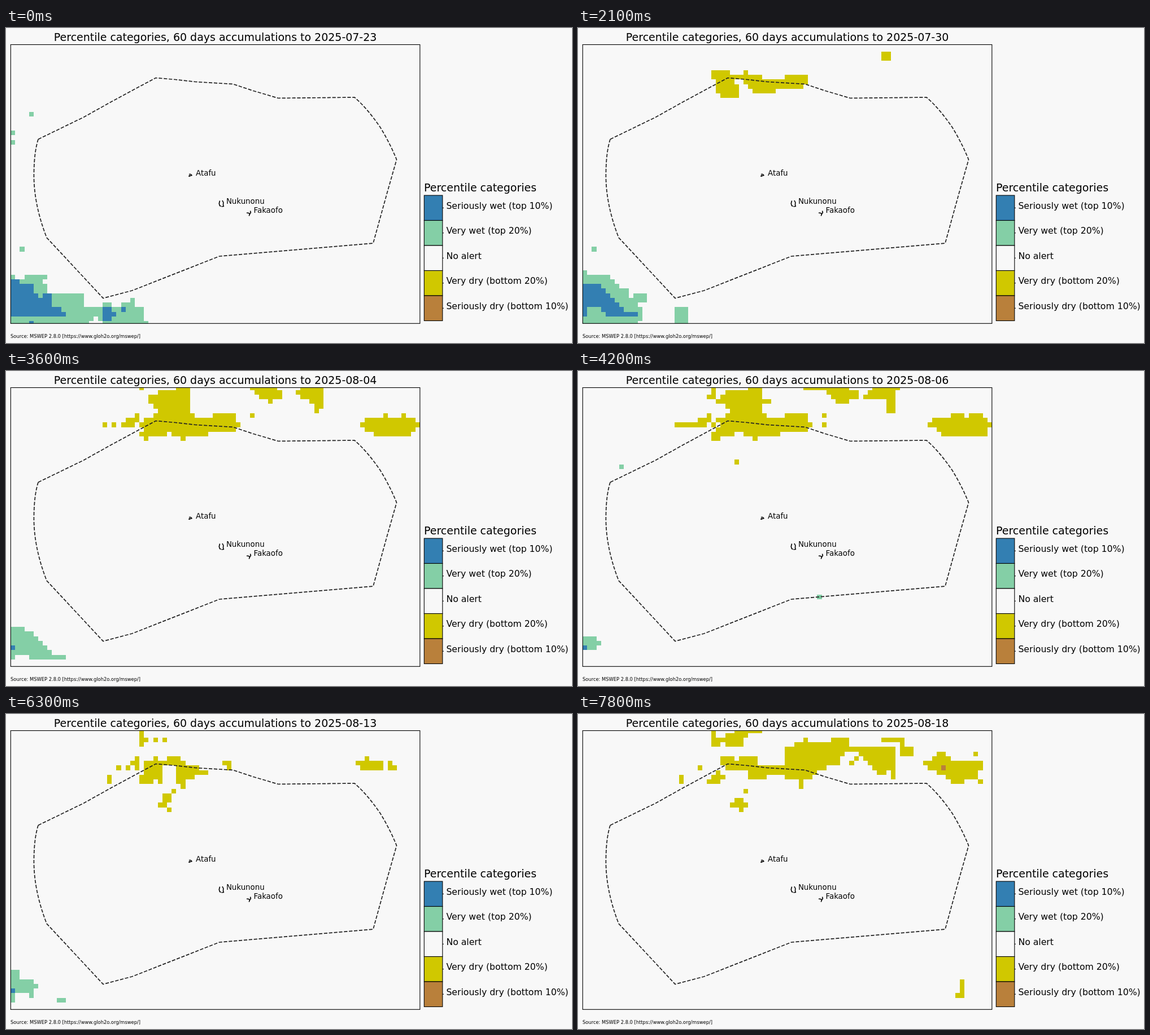
An HTML page that plays this animation: 1002 px wide and 559 px high, repeating every 8 s.

```html
<!DOCTYPE html>
<html lang="en">
<head>
<meta charset="utf-8">
<title>Percentile categories</title>
<style>
  html, body { margin: 0; width: 100%; height: 100%; overflow: hidden; background: #f8f8f8; }
  svg { display: block; width: 1002px; height: 559px; }
  text { font-family: "DejaVu Sans", sans-serif; fill: #000; }
  .head { font-size: 18.98px; }
  .key { font-size: 15.7px; }
  .place { font-size: 13.35px; }
  .line { fill: none; stroke: #000; stroke-width: 1.1; }
</style>
</head>
<body>
<svg viewBox="0 0 1002 559">
  <defs><clipPath id="frame"><rect x="8" y="29.4" width="725" height="494.8"/></clipPath></defs>
  <rect width="1002" height="559" fill="#f8f8f8"/>
  <g clip-path="url(#frame)">
    <g id="cells" transform="translate(8.2 25.4) scale(8.143 8.247)" shape-rendering="crispEdges"></g>
  </g>
  <path fill="none" stroke="#222" stroke-width="1.7" stroke-dasharray="6.2 2.7"
    d="M57 197.5L138 158L188 130L265 88.5L300 91.5L335 95.5L402 99.5L438 111.5L482 124.5L617 123Q640 143 663 177Q680 205 691.5 233.5L674 295L650 382L378 405L223 466L172 479.5L72 372Q48 310 49.5 255Q50 220 57 197.5"/>
  <g fill="none" stroke="#000" stroke-width="1.6" stroke-linejoin="round">
    <path d="M324 259.5l3 0 2 2-2 .5-3 1.2 1-2.2"/>
    <path d="M378.5 306.5l-1.2 5 1 3.5 2 1.5M383 306l1.8 3.5-.3 4.5 .8 2.5-4 .3"/>
    <path d="M432.5 324.5l.8 3-2 3-1 3M426 328l4 .5 1.5 2"/>
  </g>
  <rect class="line" x="8.3" y="29.5" width="724.5" height="494.8"/>
  <g class="place">
    <text x="336.1" y="261.5">Atafu</text>
    <text x="389.9" y="312">Nukunonu</text>
    <text x="438.5" y="328">Fakaofo</text>
  </g>
  <text id="title" class="head" x="370.6" y="23" text-anchor="middle"></text>
  <text class="head" x="740" y="289.5">Percentile categories</text>
  <g id="legend" class="key"></g>
  <text x="8" y="549.5" font-size="8.33">Source: MSWEP 2.8.0 [https://www.gloh2o.org/mswep/]</text>
</svg>
<script>
const LOOP = 8000, STEP = 300, DAYS = 27, COLS = 89, ROWS = 61;
const WET2 = 2, WET = 1, DRY = -1, DRY2 = -2;
const CATEGORIES = [
  [WET2, '#337fb2', 'Seriously wet (top 10%)'],
  [WET, '#84cfa6', 'Very wet (top 20%)'],
  [0, '#f8f8f8', 'No alert'],
  [DRY, '#d0c800', 'Very dry (bottom 20%)'],
  [DRY2, '#b9803b', 'Seriously dry (bottom 10%)'],
];

// Outlines of the alert areas in grid units on selected days; days between are blended.
const KEY_DAYS = [
  { day: 0, areas: [
    [WET, 'M4 15h1v1h-1M0 19h1v1h-1M0 21h1v1h-1M2 44h1v1h-1'],
    [WET, 'M0 50H1V51H3V50H8V51H7V52H8V54H16V57H20V56H22V57H24V56H26V55H27V57H29V60H30V61H20V60H19V59H18V60H17V61H0z'],
    [WET2, 'M0 51H2V52H5V54H6V55H7V54H9V57H11V58H12V59H0zM4 60h1v1h-1M20 57H22V58H23V59H22V60H20zM24 57h1v1h-1'],
  ] },
  { day: 4, areas: [
    [WET, 'M2 44h1v2h-1M16 45h2v1h-2M15 47H19V48H18V49H15zM22 48h1v1h-1M24 51H26V52H27V53H26V54H25V53H24zM23 53h1v1h-1'],
    [WET, 'M0 49H1V50H8V54H15V56H13V57H11V58H20V56H22V57H24V56H26V57H28V58H29V60H30V61H19V59H15V61H0z'],
    [WET2, 'M0 51H6V52H5V54H6V55H5V57H2V58H1V59H0zM7 54h2v1h-2M6 55h1v1h-1M9 57H11V58H12V59H9zM20 57h3v4h-3'],
  ] },
  { day: 9, areas: [
    [WET, 'M2 44h1v1h-1M0 49H1V50H5V51H7V52H8V53H10V54H14V56H13V55H12V57H13V58H12V61H2V60H1V61H0zM6 52h1v1h-1M10 54h1v1h-1M9 55h1v2h-1M20 57H22V59H21V58H20z'],
    [WET2, 'M0 52H3V53H5V54H6V55H7V56H8V57H9V58H12V59H4V57H1V59H0z'],
    [DRY, 'M28 0h1v1h-1M65 1H67V2H68V4H67V6H66V4H64V2H65zM52 6h1v1h-1M20 8h1v1h-1M22 7H24V8H23V9H22zM24 8h2v1h-2'],
    [DRY, 'M27 6H33V7H34V6H37V7H40V8H43V7H46V6H48V7H50V9H48V11H47V10H43V11H36V9H35V8H33V9H34V10H35V12H29V8H26V7H27z'],
  ] },
  { day: 14, areas: [
    [WET, 'M8 17h1v1h-1M51 45h1v1h-1M0 54H3V55H4V56H3V57H0z'],
    [WET2, 'M0 56h1v1h-1'],
    [DRY, 'M36 0H39V3H41V4H39V6H40V7H44V6H49V8H50V9H49V10H43V11H38V12H37V11H35V10H33V11H30V12H28V10H29V9H30V8H29V7H31V6H32V5H31V4H29V3H30V2H31V1H36z'],
    [DRY, 'M28 0H29V3H27V2H28zM27 6H28V8H27V9H20V8H25V7H27zM28 8h1v1h-1M52 6h1v1h-1M52 8h1v1h-1M33 16h1v1h-1'],
    [DRY, 'M48 0H58V1H60V3H58V4H55V3H54V2H53V1H48zM63 0H69V1H68V6H66V3H61V2H62V1H63z'],
    [DRY, 'M80 6H83V7H84V6H87V7H88V8H89V9H88V11H78V10H77V9H75V8H76V7H80z'],
  ] },
  { day: 18, areas: [
    [WET, 'M0 54H2V55H5V56H4V57H1V58H0z'],
    [DRY, 'M28 0H29V1H32V0H39V4H36V3H29V4H27V3H25V2H26V1H28zM37 4h1v1h-1M34 5h1v1h-1M36 5h1v1h-1'],
    [DRY, 'M30 6H41V7H43V8H45V6H50V7H49V9H43V10H39V11H36V10H35V9H33V10H32V11H30V12H28V10H31V9H29V7H30z'],
    [DRY, 'M28 6H29V7H28V8H27V9H22V8H25V7H28zM52 6h2v1h-2M52 8h1v1h-1M35 13h1v1h-1M33 15h1v2h-1'],
    [DRY, 'M48 0H61V2H63V0H69V1H68V5H67V6H66V4H64V3H60V5H57V4H54V3H51V2H50V1H48zM61 4h1v1h-1M69 2h1v1h-1'],
    [DRY, 'M87 1H89V2H88V4H89V7H88V8H87V9H79V10H77V9H76V8H75V7H76V4H85V3H86V2H87z'],
  ] },
  { day: 21, areas: [
    [WET, 'M0 52H2V54H5V55H6V56H5V58H4V57H1V59H0zM10 58h2v1h-2'],
    [WET2, 'M0 56h1v1h-1'],
    [DRY, 'M28 0H29V2H30V3H29V4H28zM31 2h1v1h-1M33 2h1v1h-1M27 6H28V9H27V8H26V7H27zM23 8h1v1h-1M25 8h1v1h-1M21 10h1v2h-1'],
    [DRY, 'M31 6H32V7H34V6H37V7H38V8H41V9H43V10H40V11H38V13H37V12H36V8H33V12H32V11H31V12H28V10H29V7H31z'],
    [DRY, 'M35 13h1v1h-1M33 14H35V16H34V17H32V16H33zM34 17h1v1h-1M46 7H48V9H47V8H46zM77 6H78V7H81V9H76V8H75V7H77zM82 7H83V8H84V9H82z'],
  ] },
  { day: 26, areas: [
    [DRY, 'M28 0H29V2H31V1H33V0H39V1H36V2H35V4H31V3H30V4H28zM25 8h1v1h-1M21 10h1v2h-1M29 9H30V10H31V11H30V12H27V11H28V10H29z'],
    [DRY, 'M30 6H33V7H34V6H38V8H44V4H46V3H48V2H49V3H54V2H58V4H68V10H67V9H66V10H64V9H63V8H62V7H61V6H60V5H57V6H56V8H53V9H51V10H50V11H48V13H47V11H44V10H40V11H36V9H31V8H30z'],
    [DRY, 'M65 2H70V4H72V6H69V3H65zM67 10h1v1h-1M35 13h1v1h-1M33 15H35V16H36V17H35V18H34V17H32V16H33zM59 6H60V7H59V8H58V7H59z'],
    [DRY, 'M77 5H79V6H80V7H87V9H86V11H83V12H80V11H79V10H77V9H75V8H74V7H76V6H77zM85 5h1v1h-1M86 11h1v1h-1M82 54H83V58H81V57H82z'],
    [DRY2, 'M78 8h1v1h-1'],
  ] },
];

const probe = document.createElement('canvas').getContext('2d');

function gridOf(areas) {
  const grid = new Float32Array(COLS * ROWS);
  for (const [level, outline] of areas) {
    const path = new Path2D(outline);
    for (let i = 0; i < grid.length; i++) {
      if (probe.isPointInPath(path, i % COLS + .5, Math.floor(i / COLS) + .5, 'evenodd')) grid[i] = level;
    }
  }
  return grid;
}

function neighbourMean(grid, i) {
  const col = i % COLS, row = Math.floor(i / COLS);
  let sum = 0, count = 0;
  for (let r = Math.max(0, row - 1); r <= Math.min(ROWS - 1, row + 1); r++) {
    for (let c = Math.max(0, col - 1); c <= Math.min(COLS - 1, col + 1); c++) {
      sum += grid[r * COLS + c];
      count++;
    }
  }
  return sum / count;
}

// Areas grow and shrink from their edges: the blend leans on each cell's surroundings.
function blend(from, to, u) {
  const mix = from.map((v, i) => v + (to[i] - v) * u);
  const lean = 2 * u * (1 - u);
  return mix.map((v, i) => Math.round(v + lean * (neighbourMean(mix, i) - v)));
}

function runsPath(grid, level) {
  let d = '';
  for (let row = 0; row < ROWS; row++) {
    for (let col = 0; col < COLS; col++) {
      const start = col;
      while (col < COLS && grid[row * COLS + col] === level) col++;
      if (col > start) d += `M${start} ${row}H${col}v1H${start}z`;
    }
  }
  return d;
}

function svg(tag, attrs, parent) {
  const el = document.createElementNS('http://www.w3.org/2000/svg', tag);
  for (const key in attrs) el.setAttribute(key, attrs[key]);
  return parent.appendChild(el);
}

const legend = document.getElementById('legend');
CATEGORIES.forEach(([, fill, label], i) => {
  const y = 297 + i * 44.5;
  svg('rect', { x: 740.3, y, width: 32.5, height: 44.5, class: 'line', style: `fill:${fill}` }, legend);
  svg('path', { d: `M773 ${y + 22.2}h2`, class: 'line' }, legend);
  svg('text', { x: 779.4, y: 320.6 + i * 44.6 }, legend).textContent = label;
});

const cells = document.getElementById('cells');
const layers = CATEGORIES.filter(([level]) => level)
  .map(([level, fill]) => ({ level, path: svg('path', { fill }, cells) }));

const keys = KEY_DAYS.map(({ day, areas }) => ({ day, grid: gridOf(areas) }));
const days = Array.from({ length: DAYS }, (_, day) => {
  const next = Math.max(1, keys.findIndex(k => k.day >= day));
  const a = keys[next - 1], b = keys[next];
  const grid = blend(a.grid, b.grid, (day - a.day) / (b.day - a.day));
  return {
    date: new Date(Date.UTC(2025, 6, 23 + day)).toISOString().slice(0, 10),
    paths: layers.map(({ level }) => runsPath(grid, level)),
  };
});

const title = document.getElementById('title');
let shown = -1;

function render(time) {
  const day = Math.min(DAYS - 1, Math.floor(time % LOOP / STEP));
  if (day === shown) return;
  shown = day;
  title.textContent = `Percentile categories, 60 days accumulations to ${days[day].date}`;
  layers.forEach(({ path }, i) => path.setAttribute('d', days[day].paths[i]));
}

const start = performance.now();
function tick() {
  render(performance.now() - start);
  requestAnimationFrame(tick);
}
tick();
</script>
</body>
</html>
```
